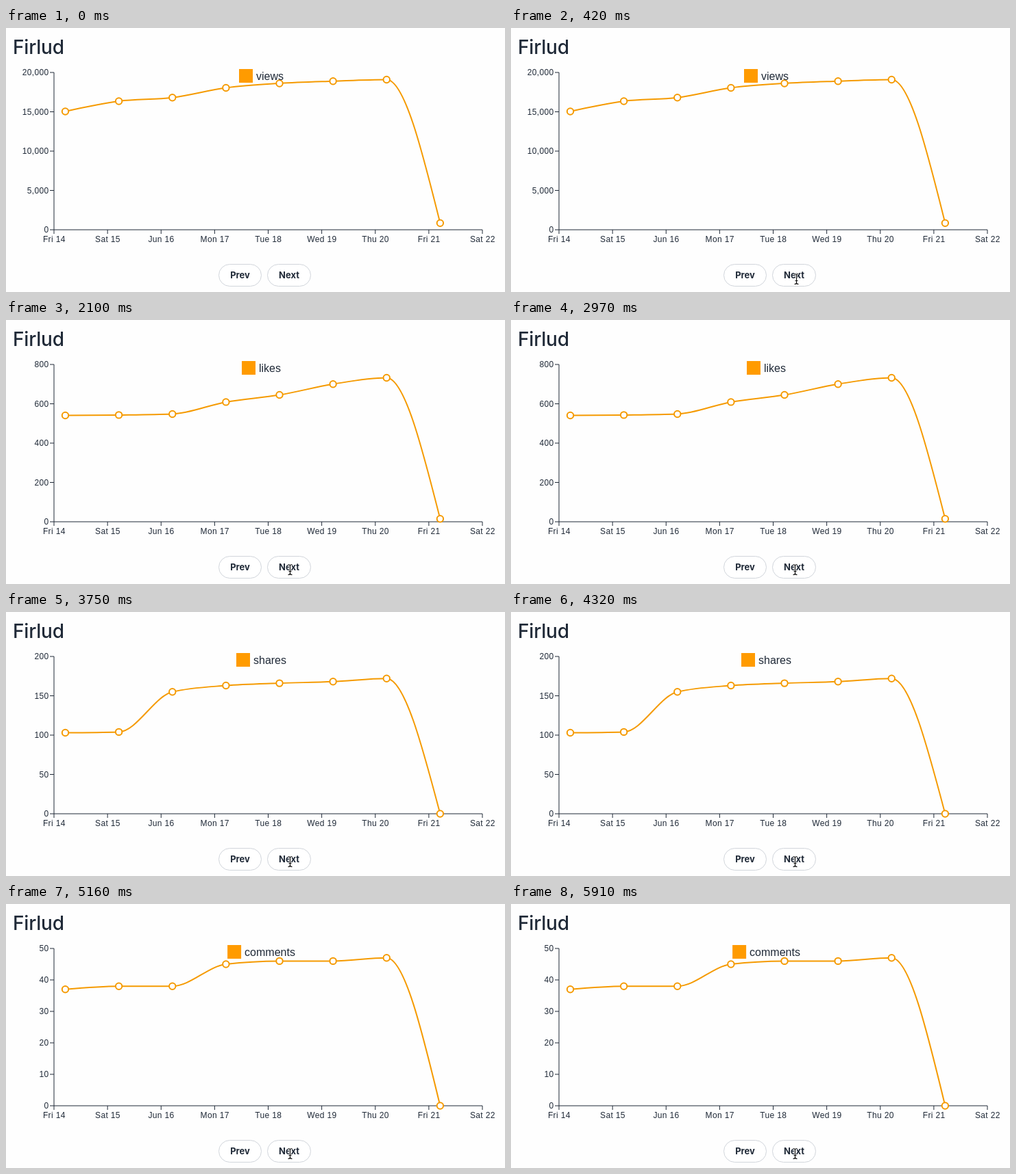
These frames come from a looping animation (728 px wide and 386 px high, 5.94 s). An HTML page with a canvas:

```html
<!DOCTYPE html>
<html lang="en">
<head>
<meta charset="utf-8">
<title>Daily statistics</title>
<style>
  html, body { margin: 0; width: 100%; height: 100%; overflow: hidden; background: #fefefe; }
  canvas { display: block; width: 728px; height: 386px; }
</style>
</head>
<body>
<canvas id="stage"></canvas>
<script>
const W = 728, H = 386, LOOP = 5940;
const INK = '#1f2937', ORANGE = '#ff9b00', STROKE = '#f59a00', PAPER = '#fefefe';
const SANS = '"Liberation Sans", Arial, sans-serif';
const INTER = 'Inter, sans-serif';
const LEFT = 70, BASE = 295, PLOT_H = 230, STEP = 78.125, FIRST = 86.5;

const days = ['Fri 14', 'Sat 15', 'Jun 16', 'Mon 17', 'Tue 18', 'Wed 19', 'Thu 20', 'Fri 21', 'Sat 22'];
const series = [
  { from: 0, name: 'views', max: 20000, tick: 5000,
    data: [15050, 16350, 16800, 18040, 18610, 18890, 19090, 850] },
  { from: 1500, name: 'likes', max: 800, tick: 200,
    data: [541, 543, 548, 609, 645, 700, 732, 15] },
  { from: 3660, name: 'shares', max: 200, tick: 50,
    data: [103, 104, 155, 163, 166, 168, 172, 0] },
  { from: 4350, name: 'comments', max: 50, tick: 10,
    data: [37, 38, 38, 45, 46, 46, 47, 0] }
];

const canvas = document.getElementById('stage');
const ctx = canvas.getContext('2d');
const dpr = window.devicePixelRatio || 1;
canvas.width = W * dpr;
canvas.height = H * dpr;

function text(str, x, y, font, align = 'left', spacing = 0) {
  ctx.font = font;
  ctx.letterSpacing = spacing + 'px';
  ctx.textAlign = align;
  ctx.fillStyle = INK;
  ctx.fillText(str, x, y);
}

function line(x1, y1, x2, y2) {
  ctx.beginPath();
  ctx.moveTo(x1, y1);
  ctx.lineTo(x2, y2);
  ctx.stroke();
}

function drawAxes({ max, tick }) {
  const font = '12px ' + SANS;
  const right = LEFT + STEP * (days.length - 1);
  ctx.strokeStyle = INK;
  ctx.lineWidth = 1;
  line(LEFT, BASE - PLOT_H, LEFT, BASE);
  line(LEFT, BASE, right, BASE);
  for (let v = 0; v <= max; v += tick) {
    const y = BASE - v / max * PLOT_H;
    line(LEFT - 6, y, LEFT, y);
    text(v.toLocaleString('en-US'), 62.5, y + 4, font, 'right', 0.35);
  }
  days.forEach((day, i) => {
    const x = LEFT + i * STEP;
    line(x, BASE, x, BASE + 6);
    text(day, x + 0.3, 313, font, 'center', 0.35);
  });
}

// Tangents of a monotone cubic through evenly spaced points.
function tangents(pts) {
  const s = pts.slice(1).map((p, i) => (p.y - pts[i].y) / STEP);
  const n = s.length;
  const m = pts.map((p, i) => {
    if (i === 0 || i === n) return 0;
    const a = s[i - 1], b = s[i];
    return (Math.sign(a) + Math.sign(b)) *
      Math.min(Math.abs(a), Math.abs(b), Math.abs(a + b) / 4);
  });
  m[0] = (3 * s[0] - m[1]) / 2;
  m[n] = (3 * s[n - 1] - m[n - 1]) / 2;
  return m;
}

function drawCurve({ data, max }) {
  const pts = data.map((v, i) => ({ x: FIRST + i * STEP, y: BASE - v / max * PLOT_H }));
  const m = tangents(pts), d = STEP / 3;
  ctx.strokeStyle = STROKE;
  ctx.lineWidth = 2;
  ctx.beginPath();
  ctx.moveTo(pts[0].x, pts[0].y);
  for (let i = 1; i < pts.length; i++) {
    const p = pts[i - 1], q = pts[i];
    ctx.bezierCurveTo(p.x + d, p.y + d * m[i - 1], q.x - d, q.y - d * m[i], q.x, q.y);
  }
  ctx.stroke();
  ctx.fillStyle = '#fff';
  for (const p of pts) {
    ctx.beginPath();
    ctx.arc(p.x, p.y, 4.7, 0, Math.PI * 2);
    ctx.fill();
    ctx.stroke();
  }
}

// Key square and label, centred together above the plot.
function drawLegend({ name }) {
  const font = '16px ' + SANS;
  ctx.font = font;
  ctx.letterSpacing = '0px';
  const x = 372.5 - (25 + ctx.measureText(name).width) / 2;
  ctx.fillStyle = ORANGE;
  ctx.fillRect(x, 60, 20, 20);
  text(name, x + 25, 76, font);
}

function drawButton(label, x, w) {
  ctx.beginPath();
  ctx.roundRect(x + 0.5, 345.5, w - 1, 32, 16);
  ctx.fillStyle = '#fff';
  ctx.fill();
  ctx.strokeStyle = '#d1d5db';
  ctx.lineWidth = 1;
  ctx.stroke();
  text(label, x + w / 2, 366, '700 13px ' + INTER, 'center');
}

function drawCursor(x, y) {
  const beam = new Path2D();
  for (const k of [-1, 1]) {
    beam.moveTo(x - 3, y + 7.5 * k);
    beam.quadraticCurveTo(x, y + 7.5 * k, x, y + 5.5 * k);
    beam.quadraticCurveTo(x, y + 7.5 * k, x + 3, y + 7.5 * k);
  }
  beam.moveTo(x, y - 5.5);
  beam.lineTo(x, y + 5.5);
  beam.moveTo(x - 2, y + 2.5);
  beam.lineTo(x + 2, y + 2.5);
  for (const [color, width] of [['#fff', 2.8], ['#111', 1.2]]) {
    ctx.strokeStyle = color;
    ctx.lineWidth = width;
    ctx.stroke(beam);
  }
}

// The pointer glides in from below, then settles on the button.
function cursorAt(t) {
  const glide = 1 - (1 - Math.min(t / 420, 1)) ** 3;
  const settle = Math.min(Math.max((t - 540) / 150, 0), 1);
  return [414.5 + 2 * (1 - settle), 365 + 2 * (1 - settle) + 30 * (1 - glide)];
}

function draw(t) {
  const now = series.findLast(s => t >= s.from);
  ctx.setTransform(dpr, 0, 0, dpr, 0, 0);
  ctx.fillStyle = PAPER;
  ctx.fillRect(0, 0, W, H);
  text('Firlud', 10, 37.5, '500 28px ' + INTER, 'left', -0.2);
  drawAxes(now);
  drawCurve(now);
  drawLegend(now);
  drawButton('Prev', 310, 63);
  drawButton('Next', 381, 64);
  drawCursor(...cursorAt(t));
}

let start;
function tick(now) {
  start ??= now;
  draw((now - start) % LOOP);
  requestAnimationFrame(tick);
}
draw(0);
requestAnimationFrame(tick);
</script>
</body>
</html>
```
